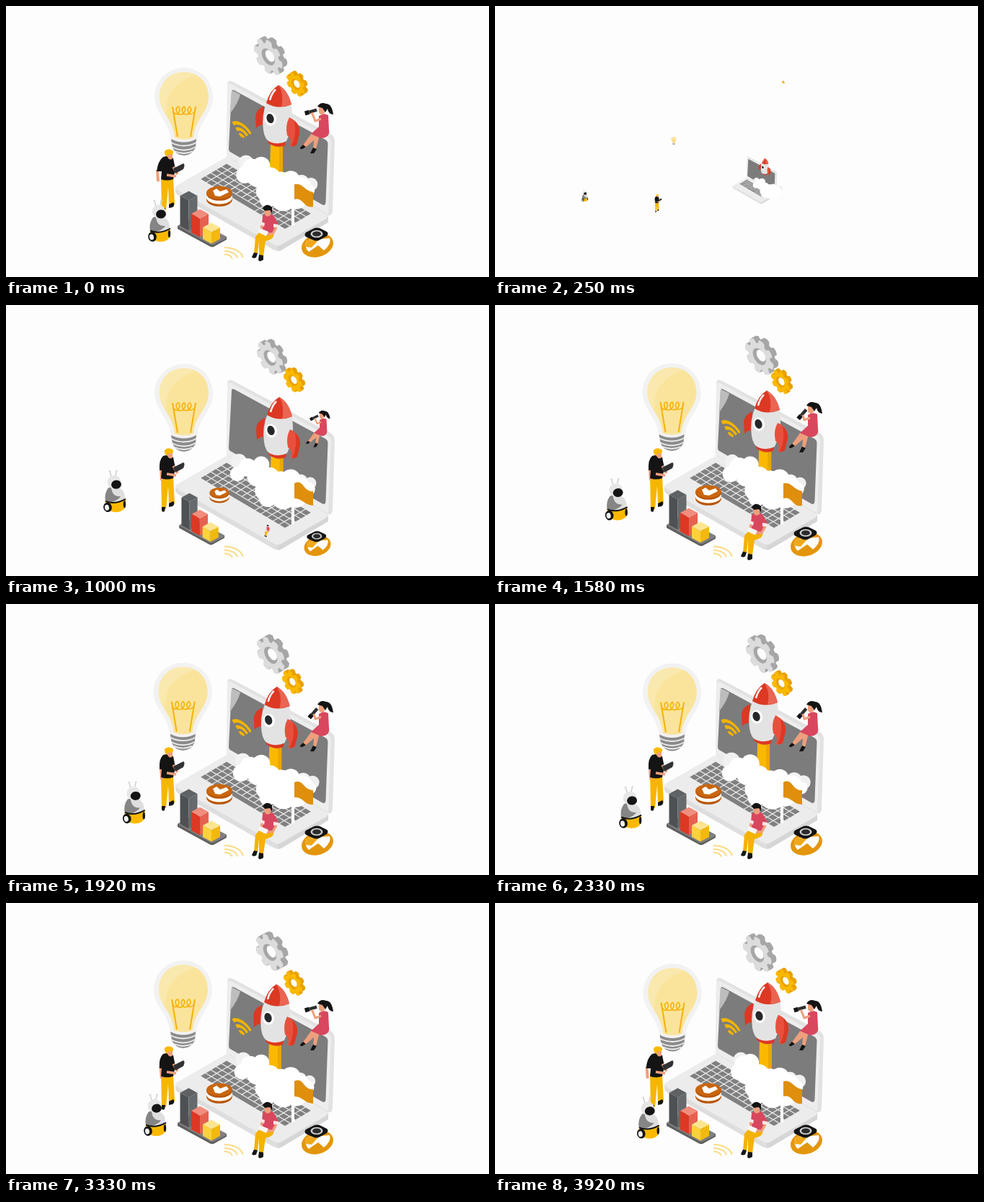
An HTML page with a canvas that plays this animation: 670x377 px, repeating every 4.01 s.

```html
<!DOCTYPE html>
<html lang="en">
<head>
<meta charset="utf-8">
<title>Launch</title>
<style>
  html, body { margin: 0; width: 100%; height: 100%; overflow: hidden; background: #fdfdfd; }
  canvas { display: block; width: 670px; height: 377px; }
</style>
</head>
<body>
<canvas id="stage" width="670" height="377"></canvas>
<script>
const ctx = document.getElementById('stage').getContext('2d');
const LOOP = 4010, FPS = 12, LAST = 47, END = 4, TAU = Math.PI * 2;
const PAPER = '#fdfdfd', GOLD = '#fab900', RED = '#dc3824', PINK = '#d8475e', SKIN = '#ee9f7d', INK = '#141414';

const clamp = v => Math.max(0, Math.min(1, v));
const ramp = (t, start, length) => clamp((t - start) / length);

// Interpolates [time, value...] rows.
function track(t, rows) {
  if (t <= rows[0][0]) return rows[0].slice(1);
  for (let i = 1; i < rows.length; i++) {
    const a = rows[i - 1], b = rows[i];
    if (t <= b[0]) {
      const k = (t - a[0]) / (b[0] - a[0]);
      return a.slice(1).map((v, j) => v + (b[j + 1] - v) * k);
    }
  }
  return rows[rows.length - 1].slice(1);
}

function fill(color, path) {
  ctx.fillStyle = color;
  ctx.fill(new Path2D(path));
}

function line(color, width, path) {
  ctx.strokeStyle = color;
  ctx.lineWidth = width;
  ctx.stroke(new Path2D(path));
}

function oval(color, x, y, rx, ry = rx, turn = 0) {
  ctx.fillStyle = color;
  ctx.beginPath();
  ctx.ellipse(x, y, rx, ry, turn, 0, TAU);
  ctx.fill();
}

// Draws scaled about (x, y), then moved by (dx, dy).
function pop(x, y, scale, draw, dx = 0, dy = 0) {
  if (scale <= 0) return;
  ctx.save();
  ctx.translate(x + dx, y + dy);
  ctx.scale(scale, scale);
  ctx.translate(-x, -y);
  draw();
  ctx.restore();
}

function keyboard() {
  const cols = 14, rows = 5;
  const spot = (c, r) => `${306 + 118 * c / cols - 37 * r / rows},${219.5 + 70 * c / cols + 22 * r / rows}`;
  const key = (c, r, w) => fill('#808080',
    `M${spot(c, r)} L${spot(c + w - .14, r)} L${spot(c + w - .14, r + .84)} L${spot(c, r + .84)}Z`);
  for (let r = 0; r < rows; r++) {
    for (let c = 0; c < cols; c++) {
      if (r === 4 && c > 3 && c < 9) continue;
      key(c, r, 1);
    }
  }
  key(4, 4, 5);
}

function laptop() {
  fill('#dedede', 'M235,252 V259 Q236,262 240,264 L371,339 Q377,342 383,339 L446,301 L447,293Z');
  fill('#d6d6d6', 'M377,333 V341 Q380,341 383,339 L447,301 V292Z');
  fill('#ececec', 'M238,249 L304,211 Q307,209 311,211 L444,289 Q449,292 444,296 L382,332 Q377,335 372,332 L238,256 Q232,252 238,249Z');
  fill('#e2e2e2', 'M307,110 Q307,102 314,105 L450,178 Q456,181 456,188 L453,286 Q452,293 446,291 L306,209Z');
  fill('#ededed', 'M307,112 Q307,106 313,109 L445,181 Q451,184 451,190 L447,290 L306,208Z');
  fill('#7c7c7c', 'M313,119 Q313,115.5 317,117.5 L443,186 Q446.5,188 446.5,192 L443.5,273 Q443,279 438,276 L311,203 Q309,202 309,198Z');
  keyboard();
}

function glare() {
  fill('#bdbdbd', 'M313,117 L325,123 Q322,135 310.5,150Z');
}

function screenSignal() {
  ctx.save();
  ctx.transform(.866, .5, 0, 1, 327, 185);
  ctx.strokeStyle = '#f2b300';
  ctx.lineWidth = 4.5;
  for (const r of [20, 12.5, 5]) {
    ctx.beginPath();
    ctx.arc(0, 0, r, -TAU * 3 / 8, -TAU / 8);
    ctx.stroke();
  }
  ctx.restore();
}

function floorSignal() {
  ctx.strokeStyle = '#f9dc84';
  ctx.lineWidth = 2;
  for (const k of [1, .7, .42]) {
    ctx.beginPath();
    ctx.ellipse(303, 352.5, 26 * k, 16.5 * k, 0, -TAU / 4, -.15);
    ctx.stroke();
  }
}

function rocket() {
  fill(RED, 'M358,139 Q347,143 346,154 L347,170 Q352,164 358,166Z');
  fill(RED, 'M364,183 Q374,194 388,189 L387,194 Q375,199 363,190Z');
  fill('#e3e3e3', 'M362,133 Q354,152 357,173 Q359,186 366,189 Q378,194 389,188 Q401,162 395,135Z');
  fill(RED, 'M378,110 Q366,117 361,135 Q377,145 396,137 Q391,117 378,110Z');
  fill('#ea6552', 'M378,110 Q391,117 396,137 Q389,140 382,140 Q386,123 378,110Z');
  line('#fff', 2.5, 'M374,116 Q368,122 366,131');
  fill('#e8503e', 'M393,155 Q408,161 407,177 L403,193 Q396,198 394,194 Q397,184 390,180 Q387,166 393,155Z');
  fill(RED, 'M400,160 Q408,166 407,177 L403,193 Q399,196 396,195 Q404,178 400,160Z');
  oval('#fff', 367, 157, 8, 9.5, -.2);
  oval('#25282b', 366.5, 156.5, 5, 6.7, -.3);
}

function flame(top) {
  fill(GOLD, `M367,${top} H383 V232 H366Z`);
  fill('#eca600', `M379,${top} H384 V232 H379Z`);
}

function clouds(t) {
  const [left, right] = track(t, [
    [.58, 1, -2], [1, -10, -1], [1.58, -4, 0], [2.33, -5, 5], [3.33, -4, -2], [3.92, 8, -1], [4, 0, 0]]);
  const puff = (x, y, r, phase, color = '#fff') =>
    oval(color, x, y, r + Math.sin(t * 3 + phase) * .8);
  puff(333 + left, 218, 11, 0, '#f2f2f2');
  puff(423 + right, 248, 9, 1, '#f0f0f0');
  puff(410 + right, 245, 10, 1, '#f4f4f4');
  puff(331 + left, 235, 11, 2);
  puff(341 + left * .6, 226, 13, 3);
  puff(354, 222, 12, 1);
  puff(348, 239, 13, 4);
  puff(366, 239, 14, 2);
  puff(360, 258, 14, 5);
  puff(363, 269, 12, 0);
  puff(381, 251, 20, 3);
  puff(385, 267, 18, 1);
  puff(395, 242, 13, 4);
  puff(409 + right * .6, 253, 14, 2);
  puff(420 + right, 256, 9, 5);
  puff(403, 268, 14, 3);
}

function flag(t) {
  const w = Math.sin(t * 5) * 1.5;
  fill('#df8f0c', `M400,248 Q407,${245 + w} 413,252 T426,259 V279 Q419,${280 + w} 413,274 T400,269Z`);
  line('#fff', 4, 'M398,247 V305');
}

function gear(x, y, size, scale, spin, face, side) {
  if (scale <= 0) return;
  const R = size * scale, shape = new Path2D();
  for (let i = 0; i < 8; i++) {
    const mid = spin + i * TAU / 8;
    for (const [a, r] of [[-.3, .76], [-.2, .97], [0, 1], [.2, .97], [.3, .76]])
      shape.lineTo(Math.cos(mid + a) * r * R, Math.sin(mid + a) * r * R);
  }
  shape.closePath();
  const layer = (color, k, draw) => {
    ctx.save();
    ctx.transform(.866, .5, 0, 1, x + R * k, y - R * k * .55);
    ctx.fillStyle = color;
    draw();
    ctx.restore();
  };
  for (let k = .15; k > -.14; k -= .04) layer(side, k, () => ctx.fill(shape));
  layer(face, -.14, () => {
    ctx.fill(shape);
    oval(side, 0, 0, R * .46);
  });
  layer(PAPER, -.04, () => oval(PAPER, 0, 0, R * .32));
}

function bulb() {
  fill('#f2f2f2', 'M247,86 C270,86 287,104 287,127 C287,151 267,160 265,188 Q247,195 229,188 C227,160 206,150 206,127 C206,104 224,86 247,86Z');
  fill('#fae49c', 'M247,92 C267,92 281,106 281,127 C281,147 262,158 260,183 Q247,188 234,183 C232,158 213,147 213,127 C213,106 227,92 247,92Z');
  fill('#fae9ae', 'M247,92 C227,92 213,106 213,127 Q214,140 222,149 Q220,111 262,96 Q255,92 247,92Z');
  line('#f5b20a', 2, 'M231,140 L238,182 M263,140 L256,182');
  line('#f5b20a', 1.6, 'M232,147 Q238,155 241,145 Q240,136 236,143 Q237,154 246,150 Q251,143 247,140 Q242,143 246,150 Q254,153 257,144 Q255,136 252,144 Q253,155 262,147');
  fill('#8b8b8b', 'M229,185 Q247,194 264,185 L263,197 Q257,208 247,208 Q236,208 231,197Z');
  line('#ededed', 1.8, 'M229,190 Q247,199 264,190 M230,196 Q247,205 263,196 M234,202 Q247,208 259,202');
}

function stander(swing) {
  fill('#f6b600', 'M215,239 L232,239 L234,276 L226,278 L225,252 L222,284 L216,284Z');
  fill(INK, 'M216,281 L221,281 L220,287 Q217,289 216,286Z M226,276 L232,273 Q235,277 231,280 L226,281Z');
  const ax = 215 - swing * 5;
  line(SKIN, 4, `M${ax},228 L${ax + 1},244`);
  fill(INK, `M218,210 Q226,207 232,212 L235,227 L232,241 Q223,244 215,241 L216,230 L${213 - swing * 4},230 Q${212 - swing},215 218,210Z`);
  line(SKIN, 3.5, 'M232,224 L238,234 M223,235 L236,237');
  fill(SKIN, 'M223,205 H231 V212 Q227,216 224,210Z');
  fill(GOLD, 'M220,202 Q224,197 231,201 Q234,205 229,207 L225,206 L224,210 Q219,207 220,202Z');
  fill('#303234', 'M232,226 L246,219 Q249,220 246,227 L235,233Z');
}

function sitter() {
  fill('#f3b300', 'M352,314 L371,317 Q373,324 360,327 L357,348 L351,347 L351,327 L349,345 L344,344 L346,321Z');
  fill(INK, 'M344,343 L349,344 L347,350 Q342,352 341,349Z M351,346 L357,347 L357,353 Q351,357 350,353Z');
  fill(PINK, 'M356,292 Q363,287 371,291 L378,304 L371,317 Q359,321 354,315Z');
  fill('#f6e9e6', 'M353,300 L359,302 L358,307 L352,304Z M371,303 L378,304 L377,309 L371,308Z');
  line(SKIN, 3.5, 'M355,305 L354,313 L361,316 M375,308 L370,317 L362,317');
  fill('#f7f7f7', 'M352,309 L364,314 L361,320 L350,315Z');
  fill(SKIN, 'M358,283 H367 L367,291 Q362,295 359,290Z');
  fill(INK, 'M356,281 Q362,273 369,280 L369,288 L366,284 L359,285Z');
}

function watcher(raise) {
  fill(SKIN, 'M424,177 L435,180 L430,199 L426,200 L427,187 L415,197 L411,195Z');
  fill(INK, 'M412,193 L416,196 L411,199 Q406,199 409,196Z M426,197 L431,199 L427,205 L422,205Z');
  fill(PINK, 'M434,153 Q441,148 447,152 L448,172 Q450,183 437,184 L423,178 L434,168Z');
  fill(SKIN, 'M434,141 L441,141 L442,149 Q437,154 434,148Z');
  fill(INK, 'M432,140 Q436,133 444,136 Q452,136 454,151 Q447,150 446,143 L443,148 L439,142Z');
  const angle = 2.28 + raise * .58;
  const tip = (r, off = 0) => `${433 + Math.cos(angle) * r},${144 + Math.sin(angle) * r + off}`;
  line('#2c2e30', 4.5, `M${tip(2)} L${tip(13)}`);
  line(INK, 6, `M${tip(13)} L${tip(19)}`);
  line(SKIN, 3, `M437,157 L429,160 L${tip(9, 2)}`);
}

function coin() {
  for (const y of [269, 261]) {
    if (y === 261) oval('#fff', 296, 266, 18, 9.5);
    oval('#b65508', 296, y, 18, 9.8);
    oval('#c9660e', 296, y - 1.5, 17.8, 9);
  }
  fill('#fff', 'M287,257 L292,254 L297,258 L306,255 L309,259 L297,265 L290,264Z');
}

function bar(x, top, height, left, right, lid) {
  fill(left, `M${x - 12},${top} L${x},${top + 6.5} V${top + height + 6.5} L${x - 12},${top + height}Z`);
  fill(right, `M${x + 12},${top} L${x},${top + 6.5} V${top + height + 6.5} L${x + 12},${top + height}Z`);
  fill(lid, `M${x - 12},${top} L${x},${top - 6.5} L${x + 12},${top} L${x},${top + 6.5}Z`);
}

function chart() {
  fill('#5f5f5f', 'M238,306 L257,296 L306,321 V325 L288,335 Q285,336 282,334 L238,310Z');
  fill('#808080', 'M238,306 L257,295 L304,320 Q307,322 304,324 L288,332 Q285,333 282,331Z');
  bar(253.5, 264, 42, '#4e5153', '#676a6c', '#5f6264');
  bar(269, 289, 26, '#dc3824', '#e66250', '#f08d7d');
  bar(285, 308, 16, '#fbd23c', '#f2b90e', '#fde590');
}

function watch() {
  oval('#e3960c', 432, 333, 22.5, 16, -.3);
  fill(PAPER, 'M417,326 L449,323 Q452,331 441,340 L433,333 L420,342 Q413,336 417,326Z');
  fill('#f0a81a', 'M417,326 L434,325 L424,336 L415,335Z');
  fill(INK, 'M416,315 L428,309 Q431,308 435,309 L445,314 Q448,316 445,320 L434,326 Q431,327 427,326 L416,321 Q413,318 416,315Z');
  oval('#cfcfcf', 431, 317, 8.5, 5.2);
  oval('#2a2c2e', 431, 317, 6, 3.6);
}

function robot() {
  line('#c8c8c8', 1.3, 'M208,278 L206,271 M214,277 L215.5,270');
  oval('#d8d8d8', 206, 271, 1.4);
  oval('#d8d8d8', 215.5, 270.5, 1.4);
  fill('#dedede', 'M202,301 Q204,293 212,293 Q226,293 227,307 Q228,317 212,318 Q199,316 199,310Z');
  fill('#858585', 'M204,294 Q198,302 200,312 L208,314 Q218,311 221,306 Q209,307 208,293Z');
  fill(GOLD, 'M200,313 Q212,318 228,310 V319 Q226,328 213,328 Q202,326 200,320Z');
  line(INK, 2, 'M200,312.5 Q213,318 228,309.5');
  oval('#e6e6e6', 212, 286, 9.3, 9.3);
  oval(INK, 215, 289.5, 7, 6, -.15);
  oval(INK, 226.5, 317, 1.7, 5);
  oval(INK, 203, 321, 5.8, 6.8, -.2);
  oval('#f2f2f2', 202, 321.5, 3, 4, -.2);
}

function scene(t) {
  ctx.fillStyle = PAPER;
  ctx.fillRect(0, 0, 670, 377);
  ctx.lineJoin = 'round';

  pop(303, 346, ramp(t, .25, .42), floorSignal);
  pop(366, 250, ramp(t, .1, .54), laptop);
  pop(313, 117, ramp(t, 1.05, .4), glare);
  pop(328, 175, ramp(t, 1.05, .4), screenSignal);

  const [rx, ry] = track(t, [
    [.1, -2, 80], [.58, -2, 45], [1, 1, 18], [1.58, -1, 9], [2.33, -4, 0], [3.33, -3, 3], [3.92, 0, .5], [4, 0, 0]]);
  if (t > .6) pop(375, 232, 1, () => flame(190 + ry), rx * .7);
  pop(376, 155, ramp(t, .1, .56), rocket, rx, ry);
  pop(380, 258, ramp(t, .1, .4), () => clouds(t));
  pop(390, 305, ramp(t, .28, .5), () => flag(t));

  const [bx, by] = track(t, [[.58, 3, 3], [1, 2, 3], [1.58, 3, 1], [2.33, 4, 0], [3.33, 2, -2], [3.92, 0, 0]]);
  gear(367 + bx, 69 + by, 23, ramp(t, .47, .575), t * .6, '#dcdcdc', '#a6a6a6');
  const [gx, gy] = track(t, [[.58, 400, 106], [1, 400, 104], [1.58, 398, 106], [2.33, 398, 110], [3.33, 400, 111], [3.92, 404, 108]]);
  gear(gx, gy, 15, ramp(t, .2, .5), -t * .9, GOLD, '#e9a100');

  const [raise] = track(t, [[1, .7], [1.58, 0], [2.33, 0], [3.2, 1]]);
  pop(438, 178, ramp(t, .6, .55), () => watcher(raise));
  const [lx, ly] = track(t, [[.58, 1, -3], [1, 0, -4], [1.58, -1.5, -5], [2.33, -1, -3.5], [3.33, -1, -6], [3.92, -.5, -1.5], [4, 0, 0]]);
  pop(247, 195, ramp(t, .2, .51), bulb, lx, ly);
  pop(225, 287, ramp(t, .1, .525), () => stander(ramp(t, 3.3, .7)));
  pop(296, 265, ramp(t, .6, .53), coin);
  pop(267, 313, ramp(t, .26, .8), chart);
  pop(363, 314, ramp(t, .89, .5), sitter);
  pop(432, 346, ramp(t, .58, .5), watch);

  const back = 11.3 * Math.pow(END - t, 1.55);
  pop(212, 328, ramp(t, .1, .53), robot, -back, -back * .64);
}

const begin = performance.now();

function tick(now) {
  const elapsed = Math.max(0, now - begin) % LOOP;
  const step = Math.min(LAST, Math.floor((elapsed + 5) * FPS / 1000));
  scene(step ? step / FPS : END);   // the loop opens on the finished picture
  requestAnimationFrame(tick);
}

tick(begin);
</script>
</body>
</html>
```
